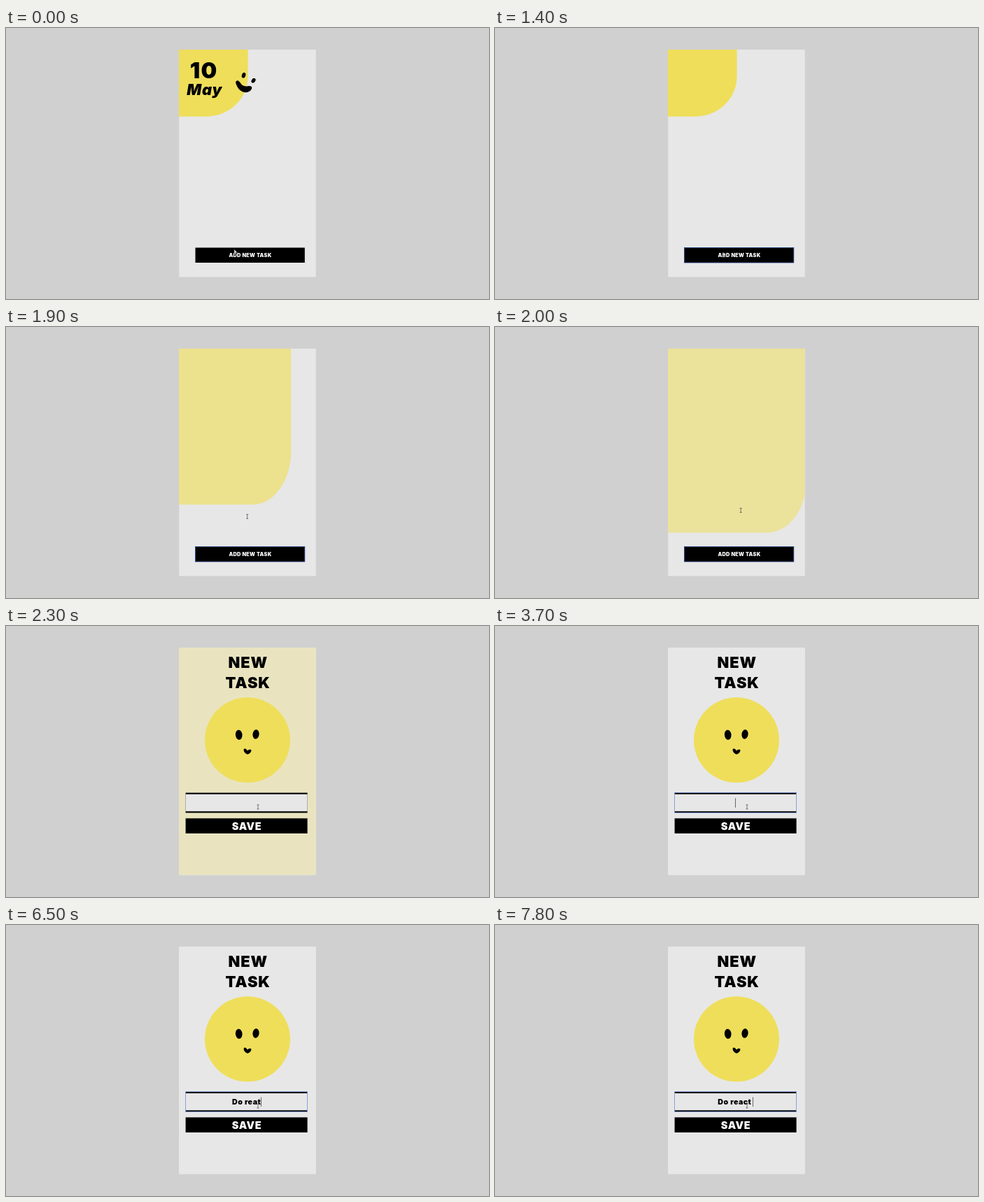
Write an HTML page with a canvas that moves like this. It is 690x388 px and loops after 8000 ms.

```html
<!DOCTYPE html>
<html lang="en">
<head>
<meta charset="utf-8">
<title>New task</title>
<style>
html, body { margin: 0; height: 100%; overflow: hidden; background: #d0d0d0; }
canvas { display: block; }
</style>
</head>
<body>
<canvas id="stage" width="690" height="388"></canvas>
<script>
const ctx = document.getElementById('stage').getContext('2d');
const LOOP = 8000, STEP = 100;
const CLICK = 1400, FORM = 2300, FOCUS = 3700;
const YELLOW = '#efde5a', PAPER = '#e7e7e7';
const card = { x: 247.3, y: 31, w: 195.4, h: 325.5 };

// Typing comes in bursts; '<' deletes the last letter
const bursts = [
  { start: 4500, gap: 300, keys: 'Do' },
  { start: 5300, gap: 300, keys: ' reat' },
  { start: 7200, gap: 200, keys: '<ct ' },
];

const lerp = (a, b, p) => a + (b - a) * p;
const span = (t, from, to) => Math.min(1, Math.max(0, (t - from) / (to - from)));
const smooth = p => p * p * (3 - 2 * p);
const easeOut = p => 1 - (1 - p) ** 2;

function box(x, y, w, h, fill) {
  ctx.fillStyle = fill;
  ctx.fillRect(x, y, w, h);
}

function outline(x, y, w, h, color) {
  ctx.strokeStyle = color;
  ctx.lineWidth = .8;
  ctx.strokeRect(x, y, w, h);
}

function setFont(px, fill, style = '') {
  ctx.font = `${style} 900 ${px}px Inter, Arial, sans-serif`;
  ctx.letterSpacing = `${px * .04}px`;
  ctx.fillStyle = fill;
}

function label(text, x, y, px, fill = '#000', style = '') {
  setFont(px, fill, style);
  ctx.textAlign = 'center';
  ctx.fillText(text, x + px * .02, y);
}

function oval(x, y, rx, ry, turn = 0, fill = '#000') {
  ctx.fillStyle = fill;
  ctx.beginPath();
  ctx.ellipse(x, y, rx, ry, turn, 0, 7);
  ctx.fill();
}

function shape(d) {
  ctx.fillStyle = '#000';
  ctx.fill(new Path2D(d));
}

// The corner panel grows over the card; its width first dips, then overshoots
function panel(t) {
  const p = span(t, 1460, 2280), grow = smooth(p);
  const swing = .344 * Math.sin(2 * Math.PI * p);
  const w = lerp(98.6, card.w + .5, grow - swing), h = lerp(96, card.h + .5, grow);
  const r = t < FORM ? .6 * (1 - .8 * p) : 0;
  const fade = easeOut(span(t, 1600, 3100));
  const color = [239, 222, 90].map(c => lerp(c, 231, fade));

  ctx.save();
  ctx.beginPath();
  ctx.rect(card.x - .3, card.y - .3, card.w + .3, card.h + .3);
  ctx.clip();
  ctx.beginPath();
  ctx.roundRect(card.x - .3, card.y - .3, w, h, [0, 0, { x: w * r, y: h * r }, 0]);
  ctx.fillStyle = `rgb(${color})`;
  ctx.fill();
  ctx.restore();
}

function home(t) {
  box(270.5, 314.5, 156.3, 21.5, '#000');
  if (t >= 200) outline(270.5, 314.5, 156.3, 21.5, '#23428c');
  label('ADD NEW TASK', 348.8, 327.7, 7.3, '#fff');
  panel(t);
  if (t >= CLICK) return;
  label('10', 282, 71.5, 32);
  label('May', 283.3, 96, 21.8, '#000', 'italic');
  oval(339.6, 67.7, 2.7, 3.9, .3);
  oval(353.5, 75.2, 2.6, 3.7, .6);
  shape('M328 78Q328.5 74.5 332 75.5Q334.5 77.5 336.5 81Q340 84.2 345 83.2Q351.5 82.3 351.3 86Q350 91.5 343 92.2Q332 92 328 78Z');
}

function form(t) {
  panel(t);
  label('NEW', 345.3, 59.7, 21.8);
  label('TASK', 345.2, 88.8, 21.8);
  oval(345, 163.3, 61, 61, 0, YELLOW);
  oval(332.7, 155.8, 4.8, 7.1, -.1);
  oval(357, 155, 4.6, 6.8, .1);
  shape('M339.7 176Q342.5 174 344.8 178.6Q347.5 175.8 350 177Q351.2 178.5 349 181.5Q345 185.8 341.3 181.5Q339 178.5 339.7 176Z');
  box(256.6, 238.7, 174, 28.8, '#000');
  box(256.6, 240.9, 174, 24.4, PAPER);
  box(256.6, 275.4, 174, 21.6, '#000');
  label('SAVE', 343.7, 291.5, 14.5, '#fff');
  if (t >= FOCUS) entry(t);
}

function typing(t) {
  let text = '', last = FOCUS;
  for (const { start, gap, keys } of bursts) {
    [...keys].forEach((key, i) => {
      const time = start + i * gap;
      if (time > t) return;
      text = key === '<' ? text.slice(0, -1) : text + key;
      last = time;
    });
  }
  return { text, last };
}

function entry(t) {
  const { text, last } = typing(t);
  outline(256.6, 238.5, 174, 29, '#7f9fe6');
  setFont(10.7, '#000');
  ctx.textAlign = 'left';
  const width = ctx.measureText(text).width, left = 343.6 - width / 2;
  ctx.fillText(text, left, 256.6);
  if ((t - last) % 1000 < 500) box(Math.floor(left + width), 246.5, 1, 13.5, '#666');
}

function cursor(t) {
  const arrow = t < 1900;
  const path = new Path2D(arrow
    ? 'M0 0V6.2L1.4 5L2.4 7.2L3.4 6.7L2.5 4.6H4.4Z'
    : 'M-1.5 -3H1.5M0 -3V3M-1.5 3H1.5');
  ctx.save();
  ctx.translate(
    lerp(326, 360, smooth(span(t, 1500, 2250))),
    lerp(317, 321, span(t, 400, 1100)) - 62 * smooth(span(t, 1400, 2100)));
  ctx.lineWidth = .7;
  ctx.strokeStyle = '#444';
  if (arrow) {
    ctx.fillStyle = '#eee';
    ctx.fill(path);
  }
  ctx.stroke(path);
  ctx.restore();
}

function draw(now) {
  const t = Math.floor(now % LOOP / STEP) * STEP;
  box(0, 0, 690, 388, '#d0d0d0');
  box(card.x, card.y, card.w, card.h, PAPER);
  (t < FORM ? home : form)(t);
  cursor(t);
}

let start;
function tick(now) {
  start ??= now;
  draw(now - start);
  requestAnimationFrame(tick);
}
requestAnimationFrame(tick);
</script>
</body>
</html>
```
